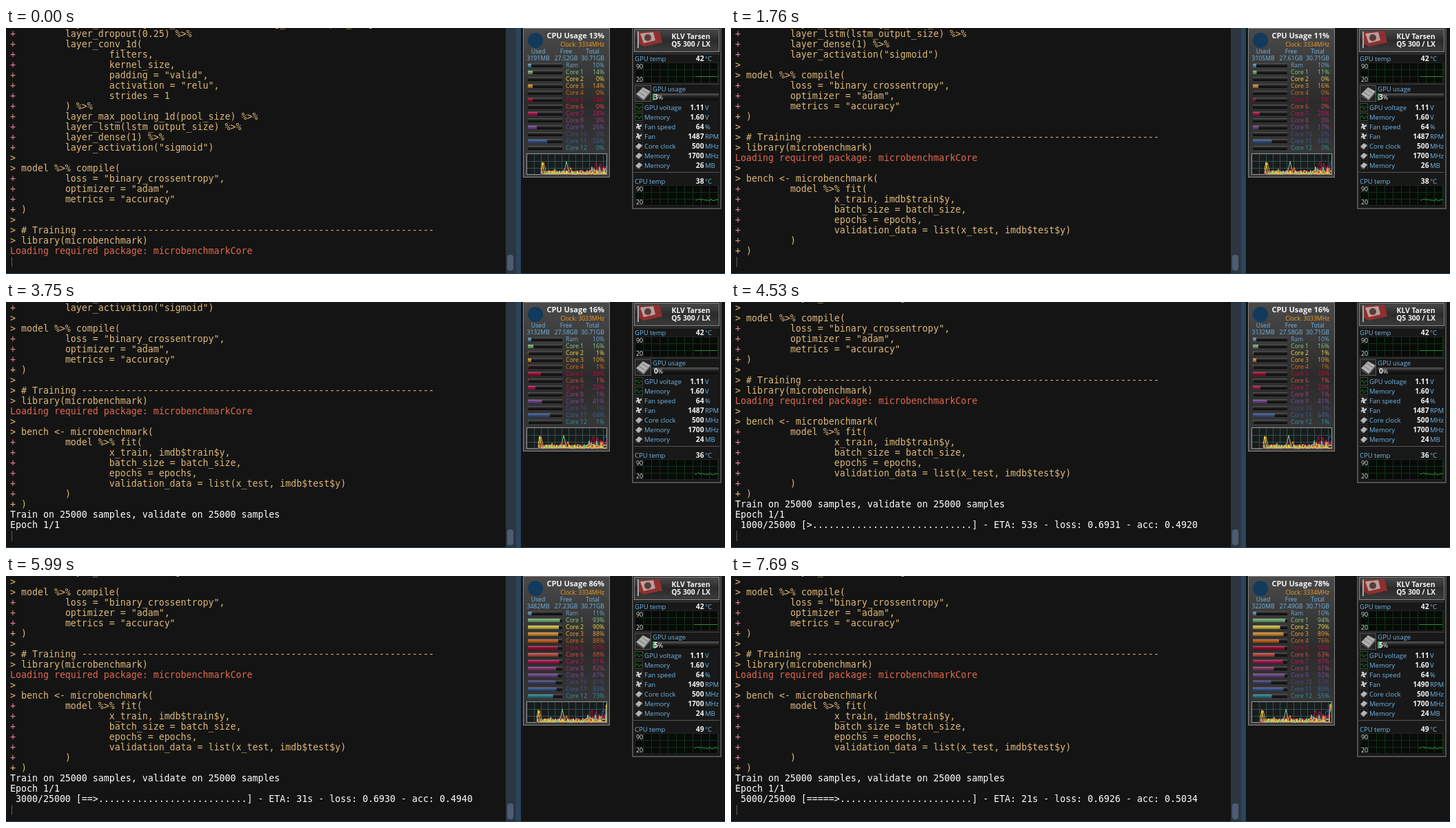
These frames come from a looping animation (1043 by 357 pixels, 8 s). An HTML page:

```html
<!DOCTYPE html>
<html lang="en">
<head>
<meta charset="utf-8">
<title>Model training console</title>
<style>
html, body { margin: 0; width: 100%; height: 100%; overflow: hidden; background: #141414; }
svg { display: block; font-family: "Open Sans", "Noto Sans", sans-serif; }
text { white-space: pre; }
.code { font: 13.288px "DejaVu Sans Mono", monospace; font-variant-ligatures: none; }
</style>
</head>
<body>
<svg width="1043" height="357" viewBox="0 0 1043 357">
  <defs>
    <linearGradient id="panel" x2="0" y2="1">
      <stop stop-color="#4a4a4a"/><stop offset=".5" stop-color="#2b2b2b"/><stop offset="1" stop-color="#3c3c3c"/>
    </linearGradient>
    <linearGradient id="track" x2="0" y2="1">
      <stop stop-color="#5a5a5a"/><stop offset=".5" stop-color="#1a1a1a"/><stop offset="1" stop-color="#0c0c0c"/>
    </linearGradient>
    <linearGradient id="gloss" x2="0" y2="1">
      <stop stop-color="#fff" stop-opacity=".25"/><stop offset=".5" stop-opacity=".1"/><stop offset="1" stop-opacity=".35"/>
    </linearGradient>
  </defs>
  <g id="scene"></g>
</svg>
<script>
const LOOP = 8000, BLUE = '#70b8e8', WHITE = '#f4f4f4';
const scene = document.getElementById('scene');

const log = `+         layer_embedding(max_features, embedding_size, input_length = maxlen) %>%
+         layer_dropout(0.25) %>%
+         layer_conv_1d(
+                 filters,
+                 kernel_size,
+                 padding = "valid",
+                 activation = "relu",
+                 strides = 1
+         ) %>%
+         layer_max_pooling_1d(pool_size) %>%
+         layer_lstm(lstm_output_size) %>%
+         layer_dense(1) %>%
+         layer_activation("sigmoid")
>
> model %>% compile(
+         loss = "binary_crossentropy",
+         optimizer = "adam",
+         metrics = "accuracy"
+ )
>
> # Training ${'-'.repeat(64)}
> library(microbenchmark)
Loading required package: microbenchmarkCore
>
> bench <- microbenchmark(
+         model %>% fit(
+                 x_train, imdb$train$y,
+                 batch_size = batch_size,
+                 epochs = epochs,
+                 validation_data = list(x_test, imdb$test$y)
+         )
+ )
Train on 25000 samples, validate on 25000 samples
Epoch 1/1`.split('\n');

// Log length after each print, and the progress lines: ETA, loss, accuracy
const printTimes = [0, 130, 2130, 4530], printed = [23, 32, 34, 35];
const fitTimes = [4530, 5310, 5990, 6690, 7470];
const fits = [[53, '0.6931', '0.4920'], [36, '0.6930', '0.4945'], [31, '0.6930', '0.4940'],
  [28, '0.6930', '0.4937'], [21, '0.6926', '0.5034']];

// Total %, clock, used MB, then twelve cores; gaps lie halfway between their neighbours
const cpuTimes = [0, 740, 1760, 2750, 3750, 4760, 5760, 6770, 7690];
const cpu = [
  [13, 3334, 3191, 14, 0, 14, 0, 14, 0, 28, 0, 26, 0, 56, 0], ,
  [11, 3334, 3105, 11, 0, 16, 0, 8, 0, 20, 0, 17, 0, 55, 0], ,
  [16, 3033, 3132, 16, 1, 10, 1, 38, 1, 22, 1, 41, 1, 64, 1],
  [10, 3334, 3228, 13, 0, 13, 2, 13, 0, 20, 0, 10, 0, 45, 0],
  [86, 3334, 3482, 93, 90, 88, 88, 87, 88, 91, 82, 87, 81, 83, 73], ,
  [78, 3334, 3220, 94, 79, 89, 76, 92, 63, 87, 61, 92, 53, 89, 55]];
for (let i = 0; i < cpu.length; i++)
  cpu[i] ??= cpu[i - 1].map((v, j) => Math.round((v + cpu[i + 1][j]) / 2));

const coreColors = ['#86cc86', '#f4dc48', '#f2a034', '#dc6a1c', '#b80a36', '#dc5248',
  '#c4145a', '#a03c80', '#7c4c9e', '#4c4688', '#3c60a0', '#2c94a6'];

// Earlier load peaks: core, sample, height, half width
const peaks = [[1, -93, 62, 3], [2, -91, 60, 4], [0, -75, 26, 3], [0, -58, 66, 4], [6, -61, 32, 4],
  [2, -52, 34, 3], [4, -56, 40, 3], [4, -15, 62, 5], [6, -9, 55, 6], [4, -4, 42, 4], [8, -20, 30, 3], [0, -37, 20, 3]];

const gpuTimes = [0, 2280, 5230];
const gpu = [{use: 3, rpm: 1487, mem: 26, temp: 38}, {use: 0, rpm: 1487, mem: 24, temp: 36},
  {use: 5, rpm: 1490, mem: 24, temp: 49}];

const stepAt = (times, t) => times.findLastIndex(s => s <= t);
const noise = (a, b) => { const s = Math.sin(a * 12.99 + b * 78.23) * 43758.5; return s - Math.floor(s); };
const esc = s => s.replace(/</g, '&lt;');
const rect = (x, y, w, h, fill, more = '') => `<rect x="${x}" y="${y}" width="${w}" height="${h}" fill="${fill}" ${more}/>`;
const frame = (x, y, w, h, fill, stroke) => rect(x + .5, y + .5, w - 1, h - 1, fill, `stroke="${stroke}"`);
const path = (d, stroke, more = '') => `<path d="${d}" fill="none" stroke="${stroke}" ${more}/>`;
const shape = (d, fill) => `<path d="${d}" fill="${fill}"/>`;
const text = (x, y, s, size, fill, anchor = 'start', weight = 400) =>
  `<text x="${x}" y="${y}" font-size="${size}" fill="${fill}" text-anchor="${anchor}" font-weight="${weight}">${s}</text>`;

function grid(x, y, w, h, gap, color) {
  let d = '';
  for (let i = gap; i < w; i += gap) d += `M${x + i + .5} ${y}v${h}`;
  for (let j = 10; j < h; j += 10) d += `M${x} ${y + j + .5}h${w}`;
  return path(d, color);
}

function progress(i) {
  const done = (i + 1) * 1000, n = Math.floor(done / 25000 * 30), [eta, loss, acc] = fits[i];
  return ` ${done}/25000 [${'='.repeat(n - 1)}>${'.'.repeat(30 - n)}] - ETA: ${eta}s - loss: ${loss} - acc: ${acc}`;
}

function codeLine(s, y) {
  const color = /^[+>]/.test(s) ? '#deb878' : s.startsWith('Loading') ? '#e0684e' : '#fff';
  const body = s.startsWith('+   ') ? `<tspan fill="#e0848a">+</tspan>${esc(s.slice(1))}` : esc(s);
  return `<text class="code" x="6" y="${y}" fill="${color}">${body}</text>`;
}

function terminal(print, fit) {
  const lines = fit < 0 ? log : [...log, progress(fit)], end = printed[print];
  return lines.slice(end - 23, end).map((s, i) => codeLine(s, i * 15 - 2)).join('') +
    rect(8, 332, 1, 15, '#5a5a5a') +
    rect(725, 0, 15, 357, '#2c3641') + rect(727, print > 1 ? 330 : 329, 9, 23, '#4c5c72', 'rx="4"') +
    rect(740, 0, 7, 357, '#28465c') + rect(0, 356, 1043, 1, '#28465c');
}

function load(core, n) {
  if (n >= 0) return cpu[n][core + 3];
  let v = noise(core + 1, n) ** 4 * 20;
  if (core % 2 == 0 && n > -24) v += noise(core + 7, n) * 22;
  for (const [c, at, height, half] of peaks)
    if (c == core) v = Math.max(v, height * (1 - Math.abs(n - at) / half));
  return v;
}

function meter(y, label, pct, color) {
  const w = pct / 2;
  return rect(757, y - 3, 50, 6, 'url(#track)') +
    rect(757, y - 2, w, 5, color, 'opacity=".85"') + rect(757, y - 2, w, 5, 'url(#gloss)') +
    text(812, y + 3, label, 8.6, color) + text(868, y + 3, pct + '%', 8.6, color, 'end');
}

function cpuPanel(k) {
  const [total, clock, used, ...cores] = cpu[k];
  let s = frame(750, 0, 126, 217, 'url(#panel)', '#858585') +
    '<circle cx="768" cy="18" r="11" fill="#123a5c"/>' +
    text(868, 15, `CPU Usage ${total}%`, 11, WHITE, 'end', 700) +
    text(868, 26.5, `Clock: ${clock}MHz`, 8.6, '#f8a020', 'end');
  [['Used', used + 'MB', 772], ['Free', (30.712 - used / 1000).toFixed(2) + 'GB', 812.5], ['Total', '30.71GB', 851]]
    .forEach(([name, value, x]) => s += text(x, 37, name, 8.6, BLUE, 'middle') + text(x, 47, value, 8.6, BLUE, 'middle'));
  s += meter(54, 'Ram', Math.round(used / 307.12), '#68a8d4');
  cores.forEach((v, i) => s += meter(64 + i * 10, 'Core ' + (i + 1), v, coreColors[i]));
  s += frame(755, 182, 117, 31, '#181c1c', '#909898') + grid(756, 183, 115, 29, 10, '#34504e');
  for (let c = 11; c >= 0; c--) {
    let d = '';
    for (let n = -95; n <= k; n++) d += `${d ? 'L' : 'M'}${871 + n - k} ${(212 - load(c, n) * .28).toFixed(1)}`;
    s += path(d, coreColors[c]);
  }
  return s;
}

function tempGraph(y, label, value, trace) {
  return text(912, y + 3.5, label, 9.5, BLUE) + reading(y, value, '°C') +
    frame(912, y + 6, 122, 30, '#080a08', '#222') + grid(912, y + 6, 122, 30, 12, '#0c3414') +
    path(trace, '#2e8c38') +
    text(914, y + 14.5, 90, 8.9, WHITE) + text(914, y + 34, 20, 8.9, WHITE);
}

const reading = (y, value, unit) =>
  text(1012.5, y + 3.5, value, 10.2, WHITE, 'end', 700) + text(1014, y + 3.5, unit, 9.5, BLUE);

const icons = {
  wave: y => frame(912, y - 6, 12, 12, '#0a160c', '#3c443c') + path(`M913 ${y + 1}l3 -3 2 5 3 -4 2 2`, '#28682e'),
  fan: y => frame(912, y - 6, 12, 12, '#141414', '#333') +
    shape(`M914 ${y - 4}h4l1 3 3 -3v4l-3 1 2 3h-4l-1 -3 -2 3v-4l2 -1z`, '#c8c8c8'),
  chip: y => frame(912, y - 6, 12, 12, '#141414', '#2c2c2c') +
    shape(`M913 ${y + 1}l5 -5 5 3 -5 6z`, '#b4b4b4') + path(`M914 ${y + 3}l4 2 5 -5`, '#707070')
};

function gpuPanel(g) {
  const {use, rpm, mem, temp} = gpu[g], start = 1000 - g;
  let wiggle = '';
  for (let x = start; x < 1034; x++)
    wiggle += `${wiggle ? 'L' : 'M'}${x} ${(251 - 3.5 * noise(Math.floor((x + g) / 2), 3)).toFixed(1)}`;
  const rows = [['wave', 'GPU voltage', '1.11', 'V'], ['wave', 'Memory', '1.60', 'V'], ['fan', 'Fan speed', 64, '%'],
    ['fan', 'Fan', rpm, 'RPM'], ['chip', 'Core clock', 500, 'MHz'], ['chip', 'Memory', 1700, 'MHz'], ['chip', 'Memory', mem, 'MB']];
  return rect(909, -2, 128, 264, '#181818', 'stroke="#505050" stroke-width="2"') +
    frame(911, 1, 124, 34, 'url(#panel)', '#8c8c8c') +
    shape('M917 6l31 -2 4 17 -27 6 -8 -5z', '#8e3030') + shape('M920 8l19 -2 3 12 -17 4z', '#b8a09c') +
    '<circle cx="931" cy="14" r="5" fill="#583c3c"/>' + shape('M916 5h2v24h-2z', '#aaa') +
    text(993.5, 15.5, 'KLV Tarsen', 10.3, WHITE, 'middle', 700) + text(993.5, 27, 'Q5 300 / LX', 10.3, WHITE, 'middle', 700) +
    rect(911, 37, 124, 1, '#444') + tempGraph(44, 'GPU temp', 42, `M${start} 70.5H1032`) +
    rect(911, 81, 124, 1, '#444') +
    frame(912, 83, 24, 24, '#242424', '#555') + shape('M914 96l10 -10 11 6 -10 12z', '#b0b0b0') +
    path('M915 99l10 6 10 -11M918 93l9 6M922 89l9 6', '#707070') +
    text(938, 92, 'GPU usage', 9.5, BLUE) + rect(938, 95, 96, 10, 'url(#track)') +
    rect(938, 95, use * .96, 10, '#4c9c68') +
    text(940, 104, `<tspan font-weight="700">${use}</tspan><tspan font-size="9">%</tspan>`, 10.2, WHITE) +
    rows.map(([icon, label, value, unit], i) => {
      const y = 115 + i * 14;
      return icons[icon](y) + text(926, y + 3.5, label, 9.5, BLUE) + reading(y, value, unit);
    }).join('') +
    rect(911, 209, 124, 1, '#555') + tempGraph(222, 'CPU temp', temp, wiggle);
}

let shown;
function draw(now) {
  const t = now % LOOP;
  const state = [printTimes, fitTimes, cpuTimes, gpuTimes].map(times => stepAt(times, t));
  if (String(state) !== shown) {
    shown = String(state);
    const [print, fit, k, g] = state;
    scene.innerHTML = terminal(print, fit) + cpuPanel(k) + gpuPanel(g);
  }
  requestAnimationFrame(draw);
}
const begin = performance.now();
const tick = () => Math.max(0, performance.now() - begin);
(function loop() {
  draw = now => {
    const t = now % LOOP;
    const state = [printTimes, fitTimes, cpuTimes, gpuTimes].map(times => stepAt(times, t));
    if (String(state) === shown) return;
    shown = String(state);
    const [print, fit, k, g] = state;
    scene.innerHTML = terminal(print, fit) + cpuPanel(k) + gpuPanel(g);
  };
  draw(tick());
  requestAnimationFrame(loop);
})();
</script>
</body>
</html>
```
